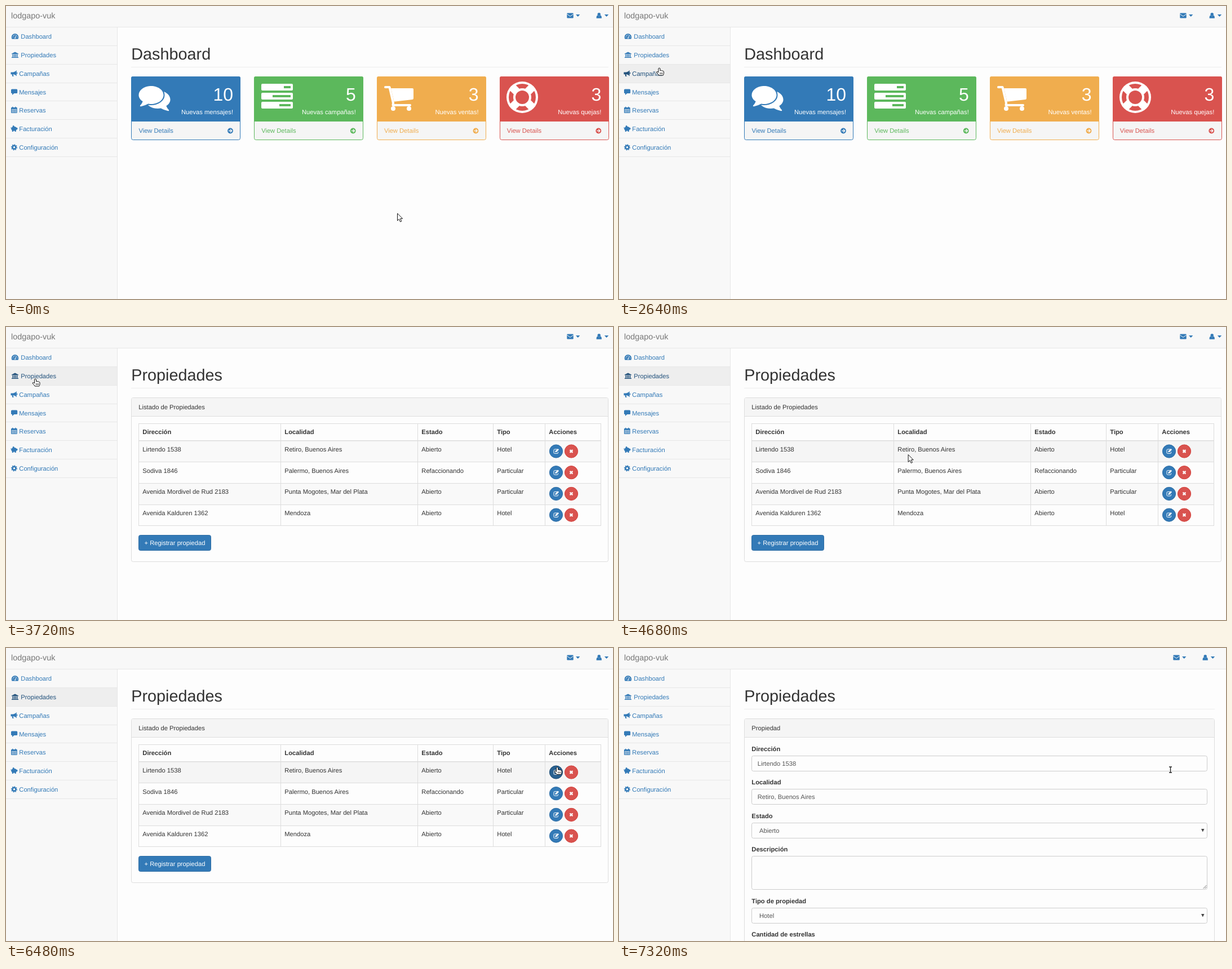
An HTML page for the animation above (8000 ms loop, 1077x520 px).

```html
<!DOCTYPE html>
<html lang="es">
<head>
<meta charset="utf-8">
<title>Panel</title>
<style>
  html, body { margin: 0; width: 100%; height: 100%; overflow: hidden; background: #fdfdfd; }
  svg { display: block; width: 100vw; height: 100vh; }
  text { font: 11.2px "Liberation Sans", Arial, sans-serif; fill: #333; text-rendering: geometricPrecision; white-space: pre; }
  .b { font-weight: 700; }
  .brand { font-size: 14.4px; fill: #777; }
  .title { font-size: 28.8px; }
  .num { font-size: 32px; }
  .white { fill: #fff; }
  .end { text-anchor: end; }
  .val { fill: #555; }
  .nav { --bg: #f8f8f8; color: #337ab7; }
  .nav.on { --bg: #eee; color: #23527c; }
  .nav text, .ico { fill: currentColor; }
  .back, .hole { fill: var(--bg); }
  .line { fill: none; stroke: currentColor; }
  .row { fill: #fdfdfd; }
  .row.odd { fill: #f9f9f9; }
  .row.on { fill: #f5f5f5; }
  .edit { fill: #337ab7; stroke: #2e6da4; }
  .edit.on { fill: #286090; stroke: #204d74; }
  .edit.down { fill: #204d74; stroke: #122b40; }
  .del { fill: #d9534f; stroke: #d43f3a; }
  .del.on { fill: #c9302c; stroke: #ac2925; }
  .hide { display: none; }
</style>
</head>
<body>
<svg id="stage" viewBox="0 0 1077 520" preserveAspectRatio="none">
  <defs>
    <path id="bubble" d="M22 8C34 8 44 15 44 24S34 40 22 40Q19.500 40 16.800 39.600Q11 43 4 44.300Q2 44.500 2.300 43Q6 39 7.200 35.200C2.600 32.500 0 28.500 0 24C0 15 10 8 22 8Z"/>
  </defs>
</svg>
<script>
const LOOP = 8000, TICK = 120, ROW = 32.86;
const svg = document.getElementById('stage');

const text = (x, y, s, cls = '') => `<text x="${x}" y="${y}" class="${cls}">${s}</text>`;
const rect = (x, y, w, h, attrs = '') => `<rect x="${x}" y="${y}" width="${w}" height="${h}" ${attrs}/>`;
const box = (x, y, w, h, fill, stroke, r = 3) =>
  rect(x + .5, y + .5, w - 1, h - 1, `rx="${r}" fill="${fill}" stroke="${stroke}"`);
const path = (d, attrs = '') => `<path d="${d}" ${attrs}/>`;
const disc = (x, y, r, attrs = '') => `<circle cx="${x}" cy="${y}" r="${r}" ${attrs}/>`;
const group = (id, body, attrs = '') => `<g id="${id}" ${attrs}>${body}</g>`;
const at = (x, y, body, attrs = '') => `<g transform="translate(${x} ${y})" ${attrs}>${body}</g>`;

// Sidebar
const hole = 'class="hole"';
const navIcons = [
  path('M10.500 58.500Q9.800 57 9.800 55A6.200 6 0 0 1 22.200 55Q22.200 57 21.500 58.500Z') +
    [[12.3, 55], [13.4, 52.4], [16, 51.2], [18.6, 52.4], [19.7, 55]].map(p => disc(...p, .8, hole)).join('') +
    path('M15 57.500L16.700 53L17.300 53.200 17 57.500Z', hole),
  path('M10 84.600L16 81.500 22 84.600V85.600H10ZM10 90.600H22V92H10Z') +
    [11.5, 14, 16.5, 19].map(x => rect(x, 86, 1.5, 4.2)).join(''),
  path('M8.500 117.400H13Q17 117 18.700 114V124.500Q17 121.700 13 121.200H12.600L13.600 125H11.400L10.600 121.200H8.500Z') +
    rect(19, 117.8, 1.2, 2.6),
  rect(9, 147.4, 11.2, 7.6, 'rx="1.600"') + path('M11 154V158L15.500 154Z'),
  rect(9, 180, 10.8, 10, 'rx="1"') + rect(11, 178.8, 1.6, 2) + rect(16.2, 178.8, 1.6, 2) +
    rect(10, 183, 8.8, .8, hole) +
    [0, 1, 2, 3].map(i => rect(10.2 + i * 2.3, 184.8, 1.5, 1.5, hole) + rect(10.2 + i * 2.3, 187.3, 1.5, 1.5, hole)).join(''),
  '<ellipse cx="14.300" cy="217.800" rx="5.200" ry="3.900"/>' + disc(13.2, 213.6, 1.5) +
    rect(10.8, 219.5, 2.2, 3.5) + rect(15.6, 219.5, 2.2, 3.5) + rect(18.2, 216.2, 2.2, 2.8) + path('M8 215L10 217H8.600Z'),
  disc(14.5, 250.8, 3, 'class="line" stroke-width="2.600"') +
    disc(14.5, 250.8, 4.8, 'class="line" stroke-width="1.500" pathLength="16" stroke-dasharray="1 1"')
];
const navNames = ['Dashboard', 'Propiedades', 'Campañas', 'Mensajes', 'Reservas', 'Facturación', 'Configuración'];
const navY = [58, 91, 124, 157, 189, 222, 255];

const sidebar = rect(0, 38, 197, 482, 'fill="#f8f8f8"') + navNames.map((name, i) => {
  const top = Math.floor(37.5 + ROW * i) + 1, bottom = Math.floor(37.5 + ROW * (i + 1));
  return `<g class="nav">${rect(0, top, 197, bottom - top, 'class="back"')}` +
    `<g class="ico">${navIcons[i]}</g>${text(i < 2 ? 26.3 : 23.3, navY[i], name)}</g>` +
    rect(0, bottom, 197, 1, 'fill="#e7e7e7"');
}).join('') + rect(197, 38, 1, 482, 'fill="#e7e7e7"');

// Top bar
const caret = x => path(`M${x} 15H${x + 7.4}L${x + 3.7} 19Z`);
const tools = rect(995.3, 12.4, 11.4, 9, 'rx="1.200"') +
  path('M995.300 14.300L1001 18.300 1006.700 14.300', 'fill="none" stroke="#f8f8f8"') + caret(1011) +
  disc(1052.2, 14.8, 2.7) +
  path('M1047.600 21.800V20Q1047.800 16.900 1050 16.600Q1052.200 18.300 1054.400 16.600Q1056.600 16.900 1056.800 20V21.800Z') +
  caret(1061.8);
const topBar = rect(0, 0, 1077, 37, 'fill="#f8f8f8"') + rect(0, 37, 1077, 1, 'fill="#e7e7e7"') +
  text(9, 22, 'lodgapo-vuk', 'brand') + group('tools', tools, 'fill="#337ab7"');

const heading = (s, right) => text(222.3, 95, s, 'title') + rect(222, 108, right - 222, 1, 'fill="#eee"');

// Dashboard cards: each icon is drawn in a 56 px square
const chat = c => at(56, 8, '<use href="#bubble" transform="scale(-1 1)"/>') +
  `<use href="#bubble" stroke="${c}" stroke-width="4"/><use href="#bubble"/>`;
const tasks = c => [[40, 12], [20, 32], [32, 20]].map(([x, w], i) =>
  rect(0, 4 + 16 * i, 56, 12, 'rx="2"') + rect(x, 8 + 16 * i, w, 4, `fill="${c}"`)).join('');
const cart = () => path('M14 12H52Q54 12 54 14V30Q54 31.700 52.200 32L19.600 35.800Z') +
  path('M4 10H11.500L18 38 17.500 42H48', 'fill="none" stroke="#fff" stroke-width="4" stroke-linecap="round" stroke-linejoin="round"') +
  disc(18, 48, 4) + disc(46, 48, 4);
const ring = c => disc(28, 28, 28) + disc(28, 28, 20, `stroke="${c}" stroke-width="8"`) + disc(28, 28, 12, `fill="${c}"`) +
  [45, 135, 225, 315].map(a => rect(41, 21, 12, 14, `transform="rotate(${a} 28 28)"`)).join('');

const cards = [
  ['#337ab7', 10, 'Nuevas mensajes!', chat, 235.5],
  ['#5cb85c', 5, 'Nuevas campañas!', tasks, 453],
  ['#f0ad4e', 3, 'Nuevas ventas!', cart, 669],
  ['#d9534f', 3, 'Nuevas quejas!', ring, 888]
].map(([c, n, label, icon, ix], i) => {
  const x = 222.3 + 217.75 * i, left = Math.round(x);
  return box(left, 125, 194, 113, '#f5f5f5', c) +
    path(`M${left} 205V128Q${left} 125 ${left + 3} 125H${left + 191}Q${left + 194} 125 ${left + 194} 128V205Z`, `fill="${c}"`) +
    at(ix, 134, icon(c), 'fill="#fff"') +
    text(x + 180.7, 168, n, 'num white end') + text(x + 180.7, 192, label, 'white end') +
    `<text x="${x + 13.1}" y="225" style="fill:${c}">View Details</text>` +
    at(x + 175.7, 221.5, disc(0, 0, 4.9, `fill="${c}"`) +
      path('M-3 0H2.500M0 -2.700L2.700 0 0 2.700', 'fill="none" stroke="#f5f5f5" stroke-width="1.400"'));
}).join('');

// Property list
const cols = [235, 487, 730, 864, 956, 1055];
const listTop = 202, listStep = 37.7;
const btnY = i => 220.5 + listStep * i;
const homes = [
  ['Lirtendo 1538', 'Retiro, Buenos Aires', 'Abierto', 'Hotel'],
  ['Sodiva 1846', 'Palermo, Buenos Aires', 'Refaccionando', 'Particular'],
  ['Avenida Mordivel de Rud 2183', 'Punta Mogotes, Mar del Plata', 'Abierto', 'Particular'],
  ['Avenida Kalduren 1362', 'Mendoza', 'Abierto', 'Hotel']
];
const pencil = path('M2 -3.500H-2.500Q-4 -3.500 -4 -2V2.500Q-4 4 -2.500 4H2Q3.500 4 3.500 2.500V1', 'fill="none" stroke="#fff"') +
  path('M-1.500 1.800V-.2L3.200 -4.600 5 -2.800 .500 1.800Z', 'fill="#fff"');
const cross = path('M-2.400 -2.400L2.400 2.400M2.400 -2.400L-2.400 2.400', 'stroke="#fff" stroke-width="2.300"');
const panelBox = (w, h, s) => box(222, 125, w, h, '#fdfdfd', '#ddd') +
  rect(223, 126, w - 2, 32, 'rx="2" fill="#f5f5f5"') + rect(222, 158, w, 1, 'fill="#ddd"') + text(235.3, 146, s);

const list = panelBox(847, 292, 'Listado de Propiedades') +
  homes.map((cells, i) => {
    const y = Math.round(listTop + listStep * i);
    return rect(235, y, 820, 38, `class="row ${i % 2 ? '' : 'odd'}"`) +
      cells.map((s, k) => text(cols[k] + 7.3, Math.round(221 + listStep * i), s)).join('');
  }).join('') +
  ['Dirección', 'Localidad', 'Estado', 'Tipo', 'Acciones'].map((s, k) => text(cols[k] + 7.3, 190, s, 'b')).join('') +
  cols.map(x => rect(x, 171, 1, 182, 'fill="#ddd"')).join('') +
  rect(235, 171, 821, 1, 'fill="#ddd"') + rect(235, 201, 821, 1.5, 'fill="#ddd"') +
  [1, 2, 3, 4].map(i => rect(235, Math.round(201.5 + listStep * i), 821, 1, 'fill="#ddd"')).join('') +
  homes.map((_, i) =>
    at(976, btnY(i), disc(0, 0, 11.6, 'class="edit"') + pencil) +
    at(1003, btnY(i), disc(0, 0, 11.6, 'class="del"') + cross)).join('') +
  box(235, 369, 129, 28, '#337ab7', '#2e6da4') + text(245.5, 387, '+ Registrar propiedad', 'white');

// Edit form
const field = (y, label, value, h = 28, select = false) => text(235.3, y, label, 'b') +
  box(235, y + 8, 809, h, '#fdfdfd', '#ccc') + text(select ? 249 : 245.7, y + 26, value, 'val') +
  (select ? path(`M1033 ${y + 19}H1038.500L1035.750 ${y + 24.500}Z`, 'fill="#444"') : '');
const form = panelBox(835, 420, 'Propiedad') +
  field(183, 'Dirección', 'Lirtendo 1538') + field(242, 'Localidad', 'Retiro, Buenos Aires') +
  field(302, 'Estado', 'Abierto', 28, true) + field(361, 'Descripción', '', 60) +
  path('M1036.500 427L1042.500 421M1039.500 427L1042.500 424', 'stroke="#777"') +
  field(453, 'Tipo de propiedad', 'Hotel', 28, true) + text(235.3, 512, 'Cantidad de estrellas', 'b');

// Pointers
const ink = 'fill="#fff" stroke="#111" stroke-linejoin="round"';
const pointers = group('arrow', path('M.500 .500V13.500L3.400 10.700 5.600 15.500 7.800 14.500 5.600 9.800H9.600Z', ink)) +
  group('hand', path('M-1.500 1.400Q0 -.500 1.500 1.400V5.200Q3 4.200 4 5.400Q5.600 4.700 6.300 6Q7.800 5.600 8 7.200V10Q7.600 12 6.800 13.500H-.800Q-2 11 -4.800 8.600Q-5 6.800 -3.400 7L-1.500 8.400Z', ink) +
    path('M1.500 8.500V11.500M3.500 8.500V11.500M5.500 8.500V11.500', 'stroke="#111" stroke-width=".800"')) +
  group('beam', ['stroke="#fff" stroke-width="3.500"', 'stroke="#222" stroke-width="1.400"'].map(s =>
    path('M-1 -2H1L1.500 -1.500 2 -2H4M1.500 -1.500V7.500M-1 8H1L1.500 7.500 2 8H4', 'fill="none" ' + s)).join(''));

svg.insertAdjacentHTML('beforeend', topBar + sidebar +
  group('dash', heading('Dashboard', 1069) + cards) +
  group('list', heading('Propiedades', 1069) + list) +
  group('form', heading('Propiedades', 1057) + form) +
  group('pointer', pointers));

// Pointer route: time, x, y
const route = [
  [0, 694, 367.5], [600, 694, 367.5], [720, 620, 345], [960, 290, 210], [1200, 73, 106], [1440, 0, 18],
  [1800, 341, 151], [2160, 71, 111], [2520, 71, 111], [2640, 71.5, 109.5], [2880, 100, 103],
  [3240, 53, 93], [3360, 53, 93], [3480, 52, 91.5], [3840, 52, 91.5], [4200, 1003, 205],
  [4320, 449, 231], [4560, 449, 231], [4920, 640, 216], [5400, 968, 231], [5520, 968, 231],
  [6000, 979, 209.5], [6360, 979, 209.5], [6480, 978, 211], [6600, 977, 213], [LOOP, 977, 213]
];
function locate(t) {
  const i = route.findIndex(p => p[0] > t);
  const [t0, x0, y0] = route[i - 1], [t1, x1, y1] = route[i];
  const k = (t - t0) / (t1 - t0);
  return [x0 + (x1 - x0) * k, y0 + (y1 - y0) * k];
}

const el = id => document.getElementById(id);
const all = cls => [...svg.querySelectorAll(cls)];
const navs = all('.nav'), rows = all('.row'), edits = all('.edit'), dels = all('.del');
const show = (ids, pick) => ids.forEach(id => el(id).classList.toggle('hide', id !== pick));

function draw(now) {
  const t = Math.floor(now % LOOP / TICK) * TICK;
  const [x, y] = locate(t);
  const page = t < 3720 ? 'dash' : t < 7320 ? 'list' : 'form';
  const focus = t >= 3720 && t < 7080 ? 1 : -1;
  const nav = x < 197 && y >= 38 && y < 268 ? Math.floor((y - 38) / ROW) : -1;
  const row = page === 'list' && x > 235 ? Math.floor((y - listTop) / listStep) : -1;
  const over = (cx, i) => page === 'list' && Math.hypot(x - cx, y - btnY(i)) < 12;
  let hand = nav >= 0;

  navs.forEach((n, i) => n.classList.toggle('on', i === nav || i === focus));
  rows.forEach((r, i) => r.classList.toggle('on', i === row));
  [[edits, 976], [dels, 1003]].forEach(([set, cx]) => set.forEach((b, i) => {
    const hit = over(cx, i);
    hand = hand || hit;
    b.classList.toggle('on', hit);
    b.classList.toggle('down', hit && t >= 7080);
  }));
  show(['dash', 'list', 'form'], page);
  show(['arrow', 'hand', 'beam'], page === 'form' ? 'beam' : hand ? 'hand' : 'arrow');
  el('tools').setAttribute('transform', `translate(${page === 'form' ? -12 : 0} 0)`);
  el('pointer').setAttribute('transform', `translate(${x} ${y})`);
}

const start = performance.now();
function loop() {
  draw(performance.now() - start);
  requestAnimationFrame(loop);
}
loop();
</script>
</body>
</html>
```
